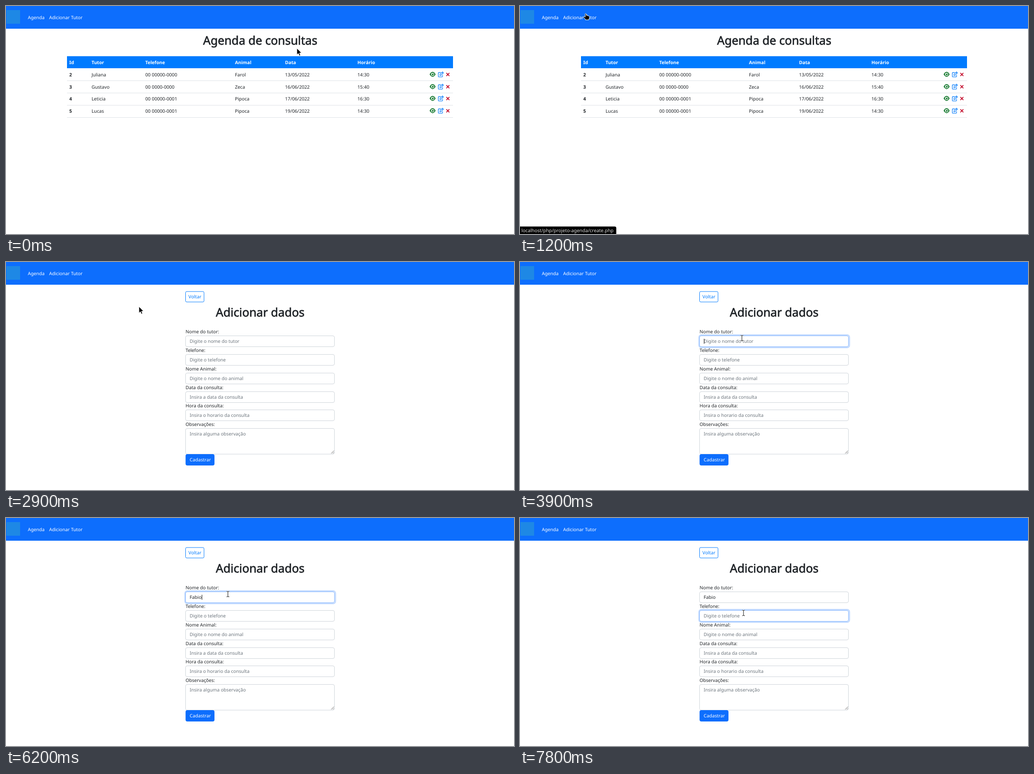
These frames come from a looping animation (1116x502 px, 8000 ms). An HTML page:

```html
<!DOCTYPE html>
<html lang="pt-BR">
<head>
<meta charset="utf-8">
<title>Agenda de consultas</title>
<style>
  html, body { margin: 0; width: 100%; height: 100%; overflow: hidden; background: #fff; }
  svg { display: block; width: 1116px; height: 502px; }
  text { font: 10.2px "Noto Sans", "Open Sans", sans-serif; fill: #212529; white-space: pre; text-rendering: geometricPrecision; }
  .bold { font-weight: 700; }
  .white { fill: #fff; }
  .blue { fill: #007bff; }
  .hint { fill: #6c757d; }
  .title { font-size: 25.7px; text-anchor: middle; stroke: #212529; stroke-width: .75px; }
  .field { fill: #fff; stroke: #ced4da; }
  .cursor { fill: #000; stroke: #fff; stroke-width: 1; stroke-linejoin: round; }
</style>
</head>
<body>
<svg id="stage" viewBox="0 0 1116 502"></svg>
<script>
const LOOP = 8000;

const text = (x, y, content, cls = '', extra = '') =>
  `<text x="${x}" y="${y}" class="${cls}" ${extra}>${content}</text>`;
const rect = (x, y, w, h, attrs) =>
  `<rect x="${x}" y="${y}" width="${w}" height="${h}" ${attrs}/>`;

const icons = `
  <g id="icons">
    <path d="M930.6 0Q937.2-10.8 943.8 0Q937.2 10.8 930.6 0Z" fill="#15792f"/>
    <circle cx="937.2" r="3.5" fill="#fff"/>
    <circle cx="937.2" r="2.3" fill="#15792f"/>
    <circle cx="936.1" cy="-1.1" r="1" fill="#fff"/>
    <g fill="none" stroke="#1684fa" stroke-width="1.3" stroke-linejoin="round">
      <path d="M955.5-4H950.8Q949.7-4 949.7-2.9V4.6Q949.7 5.7 950.8 5.7H957.9Q959 5.7 959 4.6V1.4"/>
      <path d="M953.2 2.4L953.6-.1L959-5.5L961.1-3.4L955.7 2Z M957.6-4.1L959.7-2"/>
    </g>
    <path d="M967.4-3.2L974 3.6M974-3.2L967.4 3.6" stroke="#c41230" stroke-width="1.9"/>
  </g>`;

const columns = [139, 188, 306, 503, 613, 772];
const headings = ['Id', 'Tutor', 'Telefone', 'Animal', 'Data', 'Horário'];
const bookings = [
  ['2', 'Juliana', '00 00000-0000', 'Farol', '13/05/2022', '14:30'],
  ['3', 'Gustavo', '00 0000-0000', 'Zeca', '16/06/2022', '15:40'],
  ['4', 'Leticia', '00 00000-0001', 'Pipoca', '17/06/2022', '16:30'],
  ['5', 'Lucas', '00 00000-0001', 'Pipoca', '19/06/2022', '14:30']
];
const bookingRow = (cells, i) => {
  const y = Math.round(154.8 + i * 26.75);
  return cells.map((cell, c) => text(columns[c], y, cell, c ? '' : 'bold')).join('') +
    `<use href="#icons" y="${y - 4.5}"/>` +
    rect(134, Math.round(163.9 + i * 26.9), 848, 1, 'fill="#dee2e6"');
};
const tablePage = `
  <g id="table">
    ${text(558.5, 85, 'Agenda de consultas', 'title')}
    ${rect(134, 110.5, 848, 26.5, 'fill="#007bff"')}
    ${headings.map((h, c) => text(columns[c], 128, h, 'bold white')).join('')}
    ${bookings.map(bookingRow).join('')}
    <g id="status">
      <path d="M0 485.5H208Q211.5 485.5 211.5 489V502H0Z"/>
      ${text(3, 498, 'localhost/php/projeto-agenda/create.php', '', 'style="fill:#e4e4e4;font-size:10.4px"')}
    </g>
  </g>`;

const fields = [
  ['Nome do tutor:', 'Digite o nome do tutor'],
  ['Telefone:', 'Digite o telefone'],
  ['Nome Animal:', 'Digite o nome do animal'],
  ['Data da consulta:', 'Insira a data da consulta'],
  ['Hora da consulta:', 'Insira o horario da consulta'],
  ['Observações:', 'Insira alguma observação']
];
const fieldTop = i => Math.round(162 + i * 40.85) + .5;
const fieldRow = ([label, hint], i) => {
  const y = fieldTop(i);
  const height = i === 5 ? 56.5 : 24;
  const focus = i > 1 ? '' : `<g id="focus${i}">
    ${rect(393.2, y - 1.8, 330.6, 27.6, 'rx="5" fill="none" stroke="#0d6efd" stroke-opacity=".25" stroke-width="2.7"')}
    ${rect(394.5, y, 327, height, 'rx="3.5" fill="#fff" stroke="#86b7fe"')}</g>`;
  return text(394.5, y - 5.5, label) +
    rect(394.5, y, 327, height, 'rx="3.5" class="field"') + focus +
    text(403.5, y + 15.2, hint, 'hint', `id="hint${i}"`);
};
const formPage = `
  <g id="form">
    ${rect(394.5, 65, 40.5, 23, 'rx="2.5" fill="#fff" stroke="#007bff"')}
    ${text(400.8, 80, 'Voltar', 'blue')}
    ${text(558.5, 120, 'Adicionar dados', 'title')}
    ${fields.map(fieldRow).join('')}
    ${text(403.5, 177.7, '', '', 'id="typed"')}
    <path d="M714.5 421.5L720.5 415.5M718 421.5L720.5 419" stroke="#555" stroke-width=".9"/>
    ${rect(394.5, 423, 63.5, 25, 'rx="4" fill="#0d6efd"')}
    ${text(403.5, 439, 'Cadastrar', 'white')}
    ${rect(404, 169, 1, 11, 'id="caret" fill="#111"')}
  </g>`;

const cursors = `
  <path id="arrow" class="cursor" d="M0 0V14.4L3.3 11.4L5.5 16.6L8 15.5L5.8 10.5H10.2Z"/>
  <path id="hand" class="cursor" d="M4.2 1.2Q5.3-.2 6.6 1.2V5.2Q8-.1 8.9 5.4Q10.4 4.2 11.2 6Q13 5.2 13.4 7.2V10.5Q13.2 12 12.2 13V14.5H4.6V13L.9 9.3Q-.2 7.6 1.3 7.2Q2.7 6.8 4.2 8.4Z"/>
  <g id="beam" fill="none">
    <path d="M-3-6Q0-6 0-4.8Q0-6 3-6M0-5V5M-3 6Q0 6 0 4.8Q0 6 3 6" stroke="#fff" stroke-width="2.4" stroke-opacity=".7"/>
    <path d="M-3-6Q0-6 0-4.8Q0-6 3-6M0-5V5M-3 6Q0 6 0 4.8Q0 6 3 6" stroke="#222" stroke-width="1.1"/>
  </g>`;

document.getElementById('stage').innerHTML = `
  <defs>${icons}</defs>
  ${rect(0, 0, 1116, 50, 'fill="#0d6efd"')}
  ${rect(1, 9, 30, 30, 'fill="#1e88e5"')}
  ${text(48, 28.5, 'Agenda', 'white')}
  ${text(94.7, 28.5, 'Adicionar Tutor', 'white')}
  ${tablePage}${formPage}${cursors}`;

const part = id => document.getElementById(id);
const show = (id, amount) => part(id).setAttribute('opacity', Number(amount));

// Timelines: [start in ms, value...]
const pointer = [
  [0, 'arrow', 639, 93], [700, 'arrow', 560, 78], [800, 'arrow', 300, 45],
  [900, 'hand', 139, 16], [2300, 'hand', 141, 17], [2500, 'hand', 139, 16],
  [2900, 'arrow', 292, 98], [3000, 'arrow', 472, 193],
  [3300, 'beam', 478, 175.5], [3500, 'beam', 487.5, 167.5],
  [6700, 'beam', 491, 208], [7000, 'beam', 491, 209]
];
const statusBar = [[0, 0], [1100, .5], [1200, 1]];
const focusName = [[0, 0], [3900, 1], [7200, .5], [7300, 0]];
const focusPhone = [[0, 0], [7200, .5], [7300, 1]];
const letters = [[0, 0], [5000, 1], [5500, 2], [5700, 3], [5800, 4], [6200, 5]];
const caretOn = [[0, 0], [3900, 1], [4300, 0], [5100, 1], [7000, 0], [7200, 1], [7800, 0]];

const at = (timeline, t) => timeline.findLast(([start]) => start <= t).slice(1);

function draw(t) {
  const onForm = t >= 2900;
  part('table').style.display = onForm ? 'none' : '';
  part('form').style.display = onForm ? '' : 'none';
  show('status', at(statusBar, t)[0]);
  show('focus0', at(focusName, t)[0]);
  show('focus1', at(focusPhone, t)[0]);

  const typed = part('typed');
  const count = at(letters, t)[0];
  typed.textContent = 'Fabio'.slice(0, count);
  show('hint0', !count);

  const onPhone = t >= 7200;
  const width = count && !onPhone ? typed.getComputedTextLength() : 0;
  part('caret').setAttribute('x', Math.round(403.5 + width));
  part('caret').setAttribute('y', onPhone ? 210 : 169);
  show('caret', at(caretOn, t)[0]);

  const [shape, x, y] = at(pointer, t);
  for (const id of ['arrow', 'hand', 'beam']) show(id, id === shape);
  part(shape).setAttribute('transform', `translate(${x} ${y})`);
}

const started = performance.now();
function tick() {
  draw((performance.now() - started) % LOOP);
  requestAnimationFrame(tick);
}
tick();
</script>
</body>
</html>
```
